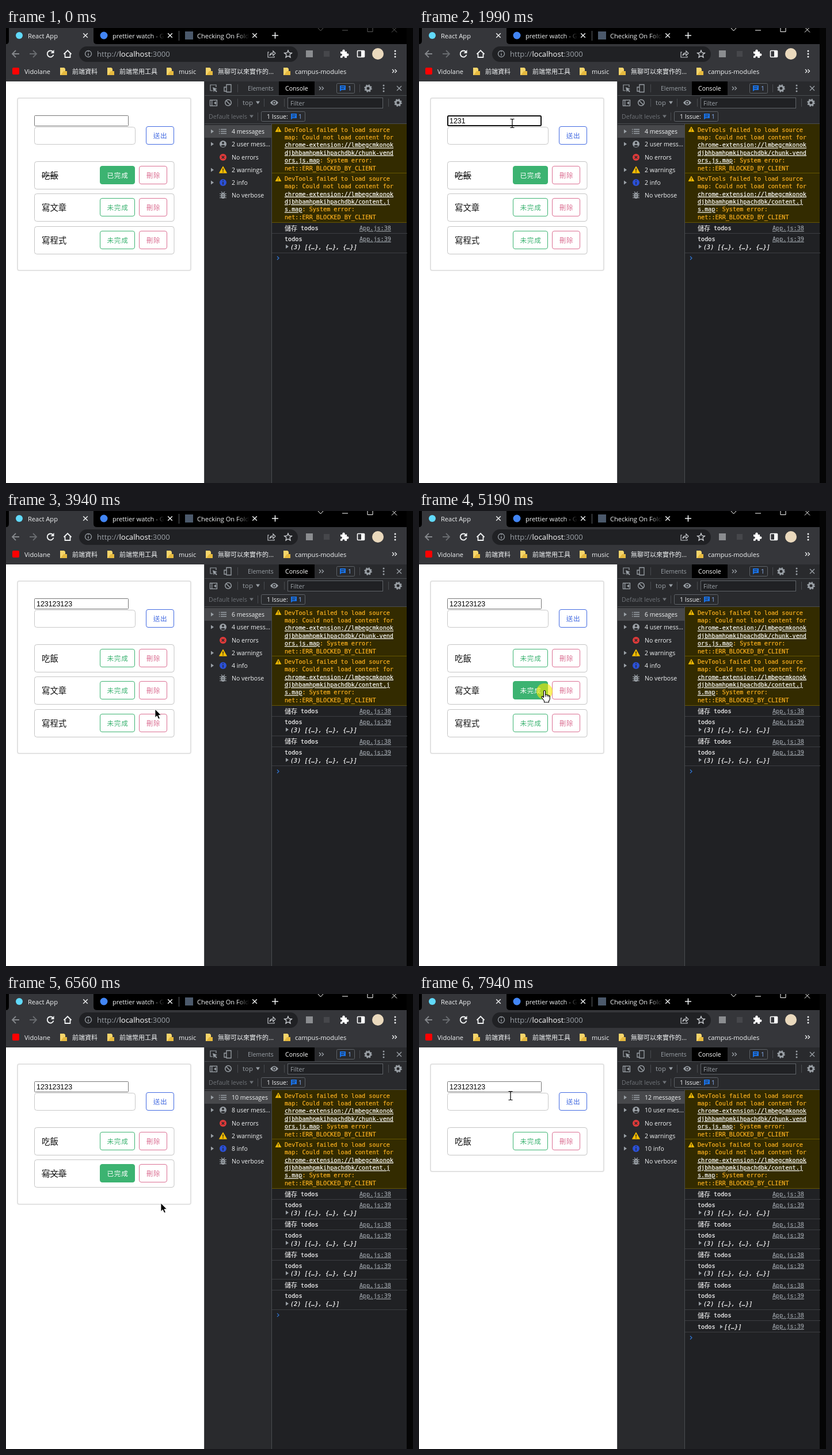
These frames come from a looping animation (707x792 px, 8 s). An HTML page:

```html
<!DOCTYPE html>
<html lang="zh-Hant">
<head>
<meta charset="utf-8">
<title>Todo list</title>
<style>
html, body { margin: 0; width: 100%; height: 100%; overflow: hidden; background: #050505; }
svg { display: block; }
text { font-family: "Open Sans", "Noto Sans CJK TC", "Noto Sans CJK", sans-serif; white-space: pre; }
.cjk { font-family: "Noto Sans CJK TC", "Noto Sans CJK", sans-serif; }
.thin { font-weight: 300; }
.mono { font-family: "DejaVu Sans Mono", "Noto Sans CJK TC", "Noto Sans CJK", monospace; }
.arial { font-family: "Liberation Sans", Arial, sans-serif; }
.link { text-decoration: underline; }
.it { font-style: italic; }
</style>
</head>
<body>
<svg width="707" height="792" viewBox="0 0 707 792">
  <g id="back"></g><g id="live"></g><g id="click"></g><g id="pointer"></g>
</svg>
<script>
const el = id => document.getElementById(id);
const rect = (x, y, w, h, fill, more = '') =>
  `<rect x="${x}" y="${y}" width="${w}" height="${h}" fill="${fill}" ${more}/>`;
const box = (x, y, w, h, stroke, r = 4, fill = 'none', sw = 1) =>
  rect(x + .5, y + .5, w - 1, h - 1, fill, `stroke="${stroke}" stroke-width="${sw}" rx="${r}"`);
const disc = (x, y, r, fill, more = '') => `<circle cx="${x}" cy="${y}" r="${r}" fill="${fill}" ${more}/>`;
const line = (d, stroke, w = 1) => `<path d="${d}" fill="none" stroke="${stroke}" stroke-width="${w}"/>`;
const shape = (d, fill, more = '') => `<path d="${d}" fill="${fill}" ${more}/>`;
// y is the middle of the capitals
const text = (x, y, s, size, fill, cls = '', more = '') =>
  `<text x="${x}" y="${y + size * .37}" font-size="${size}" fill="${fill}" class="${cls}" ${more}>${s}</text>`;
// A hairline stroke gives the console text its weight
const mono = (x, y, s, fill = '#fff', cls = '') =>
  text(x, y, s, 10.15, fill, 'mono ' + cls, `stroke="${fill}" stroke-width=".2"`);
const at = (x, y, s) => `<g transform="translate(${x} ${y})">${s}</g>`;

const PALE = '#f1f3f4', GREY = '#9aa0a6', DIM = '#6e7277', BAR = '#35363a', PANEL = '#292a2d', INK = '#202124', RULE = '#494c50';
const GREEN = '#3cb371', PINK = '#db7093', BLUE = '#4169e1';

const cross = (x, y, r, c, w = 1.4) => line(`M${x - r} ${y - r}l${2 * r} ${2 * r}m0 ${-2 * r}l${-2 * r} ${2 * r}`, c, w);
const dots = (x, y, c) => [-5, 0, 5].map(d => disc(x, y + d, 1.5, c)).join('');
const chevrons = (x, y, c) => line(`M${x - 4} ${y - 3}l3 3l-3 3m4.5 -6l3 3l-3 3`, c, 1.3);
const gear = (x, y) => disc(x, y, 4, 'none', `stroke="${GREY}" stroke-width="3"`) +
  disc(x, y, 5.8, 'none', `stroke="${GREY}" stroke-width="2" stroke-dasharray="2.3 2.255"`);
const down = (x, y, c) => shape(`M${x} ${y - 2.5}h7l-3.5 5z`, c);
const right = (x, y) => shape(`M${x} ${y - 3.5}v7l5 -3.5z`, GREY);
const bubble = (x, y) => shape(`M${x} ${y - 4}h10v8h-7l-3 2.5z`, '#1a73e8') +
  line(`M${x + 2} ${y - 1.5}h6m-6 3h5`, INK);
const warn = (x, y, s) => at(x, y, `<g transform="scale(${s})">` +
  shape('M0 -5.5L6 5H-6z', '#f5bd00', 'stroke="#f5bd00" stroke-linejoin="round"') +
  rect(-.7, -2.5, 1.4, 4, INK) + rect(-.7, 2.6, 1.4, 1.4, INK) + '</g>');
const folder = x => shape(`M${x} 69h7l2 2v11h-9z`, '#f6d56b') + shape(`M${x + 6} 75h6v7h-11z`, '#e5b93f');

function tabStrip() {
  const names = ['React App', 'prettier watch - G', 'Checking On Fold'];
  let s = rect(0, 0, 697, 30, '#000') + shape('M0 28Q5 28 5 22V0H152V22Q152 28 158 28z', BAR);
  s += disc(23, 13, 6, '#61dafb') + disc(170, 13, 6.5, '#4285f4') + rect(311, 6, 14, 14, '#4b596b');
  names.forEach((name, i) => {
    const x = i * 147;
    s += text(38 + x, 13.5, name, 11.1, PALE);
    if (i) s += rect(107 + x, 2, 21, 24, 'url(#fade)') + rect(127 + x, 2, 6, 24, '#000');
    s += cross(138 + x, 13, 3.8, PALE);
  });
  return s + rect(300, 5, 1, 17, '#5f6368') + line('M462 13h11m-5.5 -5.5v11', PALE, 1.6);
}

function toolbar() {
  const arrow = (x, c, f) => line(`M${x - 6 * f} 45h${12 * f}m${-6 * f} -6l${-6 * f} 6l${6 * f} 6`, c, 1.8);
  let s = rect(0, 28, 697, 65, BAR) + rect(127, 32, 380, 27, INK, 'rx="13.5"');
  s += arrow(17, '#85888c', 1) + arrow(47, '#696c70', -1);
  s += line('M81.5 41.5A5.5 5.5 0 1 0 82.5 46.5', PALE, 1.9) + shape('M83.5 38v6h-6z', PALE);
  s += line('M100.5 45.5l6.5 -6.5l6.5 6.5M102.5 44.5v6.5h9v-6.5', PALE, 1.8);
  s += disc(143, 45, 5.5, 'none', `stroke="${GREY}" stroke-width="1.3"`) + line('M143 44v4m0 -6v-1.2', GREY, 1.4);
  s += text(158, 45, `<tspan fill="${GREY}">http://</tspan>localhost<tspan fill="${GREY}">:3000</tspan>`, 13.1, '#fff');
  s += line('M457 42h-2v9h11v-2M458 48q1 -5 6 -5v-3l4 4l-4 4v-3q-4 0 -6 3z', '#c4c7cb', 1.2);
  s += line('M490 39l1.8 4.2l4.6 .4l-3.5 3l1.1 4.5l-4 -2.4l-4 2.4l1.1 -4.5l-3.5 -3l4.6 -.4z', '#d4d7db', 1.3);
  s += rect(521, 39, 12, 12, '#8b8d90') + rect(552, 40, 10, 10, '#46474b');
  s += shape('M581 41h3.5a2.3 2.3 0 1 1 4 0h3.5v3.5a2.3 2.3 0 1 1 0 4v3.5h-3.8a2 2 0 1 0 -3.6 0h-3.6v-3.8a2 2 0 1 0 0 -3.6z', '#fff');
  s += box(610, 39, 13, 12, '#fff', 1, 'none', 1.6) + rect(617, 40, 5, 10, '#fff');
  s += disc(646, 45, 10, '#ead9bd') + dots(676, 45, PALE);
  s += rect(11, 69, 12, 12, '#f00', 'rx="2"') + text(32, 76, 'Vidolane', 11.1, PALE);
  s += [94, 176, 279, 347, 482].map(folder).join('');
  s += text(115, 76, '前端資料', 11, PALE, 'cjk') + text(197, 76, '前端常用工具', 11, PALE, 'cjk');
  s += text(300, 76, 'music', 11, PALE) + text(368, 76, '無聊可以來實作的...', 11, PALE, 'cjk');
  return s + text(502, 76, 'campus-modules', 11.1, PALE) + chevrons(675, 75, PALE);
}

function panelBars() {
  let s = rect(344, 93, 353, 699, PANEL) + rect(462, 167, 235, 625, INK) + rect(461, 167, 1, 625, RULE);
  s += rect(344, 93, 1, 699, RULE) + [117, 166].map(y => rect(345, y, 352, 1, RULE)).join('');
  s += rect(474, 93, 62, 24, '#000') + text(420, 105, 'Elements', 10.4, GREY) + text(485, 105, 'Console', 10.6, '#fff');
  s += line('M365 103v-4h-10v10h4', GREY, 1.2) + shape('M359 103l8 3l-3.3 1.3l3 3l-1.4 1.4l-3 -3l-1.3 3.3z', GREY);
  s += line('M383 110h-4v-7h4M383 98.5h8v13h-8z', GREY, 1.3);
  s += chevrons(548, 105, GREY) + box(574, 96, 32, 18, '#5f6368', 2) + bubble(580, 104) + text(594, 105, '1', 10.5, '#8ab4f8');
  s += gear(629, 105) + dots(656, 105, GREY) + cross(683, 105, 4, GREY);
  s += [402, 614].map(x => rect(x, 98, 1, 14, RULE)).join('');
  s += [402, 448, 483, 664].map(x => rect(x, 123, 1, 14, RULE)).join('');
  s += box(354, 125, 13, 11, GREY, 0, 'none', 1.3) + rect(357, 125, 1.3, 11, GREY) + shape('M365 127.5v6l-4 -3z', GREY);
  s += disc(386, 130, 5.3, 'none', `stroke="${GREY}" stroke-width="1.5"`) + line('M382.5 126.5l7 7', GREY, 1.5);
  s += text(411, 130, 'top', 11.4, GREY) + down(434, 130, GREY);
  s += shape('M459 130q7 -9 14 0q-7 9 -14 0z', GREY) + disc(466, 130, 3, PANEL) + disc(466, 130, 1.6, GREY);
  s += box(489, 121, 166, 19, '#5f6368', 0, INK) + text(494, 131, 'Filter', 10.6, GREY) + gear(681, 130);
  s += text(352, 154, 'Default levels', 10.7, DIM) + down(423, 154, DIM) + rect(437, 147, 1, 14, RULE);
  return s + box(443, 145, 77, 18, '#5f6368', 2) + text(453, 154, '1 Issue:', 10.5, PALE) + bubble(495, 153) +
    text(508, 154, '1', 10.5, '#8ab4f8');
}

function sidebar() {
  let s = rect(345, 169, 116, 22, '#47484b') + [180, 202, 247, 269].map(y => right(356, y)).join('');
  s += line('M373 176.5h10m-10 3.5h10m-10 3.5h10M370 176.5h1.5m-1.5 3.5h1.5m-1.5 3.5h1.5', GREY, 1.3);
  s += disc(377, 202, 6, GREY) + disc(377, 200, 2, PANEL) + shape('M373 205.5q4 -4 8 0q-4 3 -8 0z', PANEL);
  s += disc(377, 225, 6, '#e03a3a') + cross(377, 225, 2.3, PANEL, 1.5) + warn(377, 247, 1.05);
  s += disc(377, 269, 6, '#2b50d6') + line('M377 268v4.5m0 -6v-1.7', PANEL, 1.6);
  s += rect(373.5, 287, 7, 10, GREY, 'rx="3.5"') + line('M371 288.5h12m-12 3.5h12m-12 3.5h12M374 285l2 2m4 -2l-2 2', GREY, 1.2);
  s += line('M375.5 290.5h3m-3 3h3', PANEL) + text(392, 225, 'No errors', 10.5, PALE);
  return s + text(392, 247, '2 warnings', 10.5, PALE) + text(392, 291.5, 'No verbose', 10.5, PALE);
}

function warnings() {
  const gold = '#ffb31f';
  const files = [['djbhbamhpmkihpachdbk/chunk-vend', 'ors.js.map'], ['djbhbamhpmkihpachdbk/content.j', 's.map']];
  return files.map(([head, tail], i) => {
    const top = 167 + i * 86;
    const row = (n, s, fill = gold, cls) => mono(484, 177 + i * 85.3 + n * 13.35, s, fill, cls);
    return rect(462, top, 235, 85, '#332b00') + rect(462, top + 85, 235, 1, '#665500') + warn(473, top + 9.5, .8) +
      row(0, 'DevTools failed to load source') + row(1, 'map: Could not load content for') +
      row(2, 'chrome-extension://lmbegcmkonok', '#fff', 'link') + row(3, head, '#fff', 'link') +
      row(4, `<tspan class="link" fill="#fff" stroke="#fff">${tail}</tspan>: System error:`) +
      row(5, 'net::ERR_BLOCKED_BY_CLIENT');
  }).join('');
}

el('back').innerHTML =
  '<defs><linearGradient id="fade"><stop stop-color="#000" stop-opacity="0"/><stop offset="1"/></linearGradient></defs>' +
  tabStrip() + toolbar() + rect(0, 93, 344, 699, '#fff') + panelBars() + sidebar() + warnings() +
  rect(696, 0, 11, 792, '#050505');

const LOOP = 8000, SHOWN = 70, ACTIVE = 870, FOCUS = 1000, BLUR = 2880;
const KEYS = [1550, 1620, 1690, 1990, 2040, 2090, 2250, 2285, 2320];
const SAVES = [3180, 5340, 6400, 7430];
const CLICKS = [[870, 1000], [2880, 3180], [5130, 5340], [6160, 6400], [7250, 7430]];
// time, x, y
const PATH = [[70, 694, 330], [400, 430, 250], [840, 163, 172], [870, 162, 166], [2570, 162, 166],
  [2720, 194, 251], [3460, 194, 251], [3580, 258, 362], [3790, 258, 362], [3940, 259, 345], [4060, 262, 350],
  [4260, 262, 350], [4600, 255, 361], [5040, 212, 338], [5070, 212, 338], [5120, 218, 313], [5530, 218, 313],
  [5810, 269, 364], [6950, 269, 364], [7130, 262, 314], [7500, 262, 314], [7730, 164, 230],
  [7760, 164, 230], [7940, 159, 177]];

const passed = (list, t) => list.filter(k => t >= k).length;

function place(t) {
  const i = PATH.findIndex(p => p[0] > t);
  if (i < 0) return PATH[PATH.length - 1].slice(1);
  if (!i) return PATH[0].slice(1);
  const [t0, x0, y0] = PATH[i - 1], [t1, x1, y1] = PATH[i], u = (t - t0) / (t1 - t0);
  return [x0 + (x1 - x0) * u, y0 + (y1 - y0) * u];
}

const TODOS = ['吃飯', '寫文章', '寫程式'];
const BTN_H = 32, SEND = [243, 171, 49, BTN_H];
const rowY = i => 232 + Math.floor(i * 56.5);
const doneBox = i => [163, rowY(i) + 8, 61, BTN_H];
const delBox = i => [231, rowY(i) + 8, 49, BTN_H];

// Which control lies under the pointer
function hit(x, y, rows) {
  const inside = ([bx, by, w, h]) => x >= bx && x < bx + w && y >= by && y < by + h;
  if (inside([49, 152, 164, 19]) || inside([49, 173, 176, 30])) return 'field';
  if (inside(SEND)) return 'send';
  for (let i = 0; i < rows; i++) {
    if (inside(doneBox(i))) return 'done' + i;
    if (inside(delBox(i))) return 'del' + i;
  }
  return '';
}

function button([x, y, w, h], label, color, full) {
  return box(x, y, w, h, color, 3.5, full ? color : '#fff') +
    text(x + w / 2 + .5, y + 17, label, 11.6, full ? '#fff' : color, 'cjk thin', 'text-anchor="middle" letter-spacing=".7"');
}

function page({ saves, rows, typed, focus, over }) {
  let s = rect(20, 122, 301, rowY(rows) - 101, '#fff', 'rx="3" stroke="#e2e2e2" stroke-width="2"');
  s += focus ? rect(50, 153, 162, 17, '#fff', 'rx="1.5" stroke="#101010" stroke-width="2"') : box(49, 152, 164, 19, '#767676', 1, '#fff');
  s += text(53, 161.5, '123123123'.slice(0, typed), 12.4, '#000', 'arial');
  s += box(49, 172, 176, 31, '#c8c8c8') + button(SEND, '送出', BLUE, over === 'send');
  TODOS.slice(0, rows).forEach((name, i) => {
    const y = rowY(i), done = i === 0 ? saves < 1 : i === 1 && saves > 1;
    s += box(49, y, 243.5, 49, '#c4c4c4') + text(62, y + 25, name, 14.4, '#111', 'cjk thin');
    if (done) s += rect(62, y + 25, name.length * 14.4, 1, '#111');
    s += button(doneBox(i), done ? '已完成' : '未完成', GREEN, done || over === 'done' + i);
    s += button(delBox(i), '刪除', PINK, over === 'del' + i);
  });
  return s;
}

function log(saves) {
  const n = saves * 2 + 2, rule = y => rect(462, Math.round(y), 235, 1, '#3c3e42');
  let s = text(392, 180, n + 2 + ' messages', 10.5, PALE);
  s += text(392, 202, n + (n > 9 ? ' user mes...' : ' user mess...'), 10.5, PALE) + text(392, 269, n + ' info', 10.5, PALE);
  let end;
  for (let i = 0; i <= saves; i++) {
    const y = 348.5 + i * 52.8, items = Math.min(3, 5 - i);
    const list = '[' + Array(items).fill('{…}').join(', ') + ']';
    s += text(484, y, '儲存', 11, '#fff', 'cjk') + mono(512, y, 'todos') + mono(614, y, 'App.js:38', GREY, 'link') + rule(y + 8.5);
    s += mono(614, y + 18.7, 'App.js:39', GREY, 'link');
    if (items > 1) {
      s += mono(484, y + 18.7, 'todos') + right(486, y + 32) + mono(494, y + 32.5, `(${items}) ${list}`, '#fff', 'it');
      end = y + 42;
    } else {
      s += mono(484, y + 19.7, 'todos') + right(523, y + 19.5) + mono(530, y + 19.7, list, '#fff', 'it');
      end = y + 28.5;
    }
    s += rule(end);
  }
  return s + line(`M471 ${end + 7}l3 3l-3 3`, '#2f74d0', 1.3);
}

function controls(active) {
  const c = active ? '#fff' : '#5c5c5c';
  return line('M542 0l4.5 5l4.5 -5M584 4h10M628 -3v9.5h9v-9.5M670 -1.5l9 9m0 -9l-9 9', c);
}

const ARROW = shape('M0 0V14.5L3.3 11.5L5.8 17L8.3 15.9L5.9 10.5H10.3z', '#000', 'stroke="#fff" stroke-width=".8"');
const BEAM = line('M-3.5 -7.5h2.5l1 1l1 -1h2.5M0 -6.5v13M-3.5 7.5h2.5l1 -1l1 1h2.5', '#000', 1.2);
const HAND = shape('M-1.5 1Q-1.5 -.5 0 -.5T1.5 1V7Q3.5 5.8 4.5 7.5Q6.5 6.7 7.2 8.5Q9.3 8 9.3 10.5V14Q9.3 16 7.5 17.5V20H-.5V17.5L-5 11.5Q-5.5 9.5 -3.5 9.5L-1.5 11.5z',
  '#fff', 'stroke="#000" stroke-width="1.1" stroke-linejoin="round"') + line('M1.5 7v3.5M4.5 8v2.5M7.2 9v2', '#000', .9);

let last = '';
function draw(t) {
  const saves = passed(SAVES, t), rows = 3 - Math.max(0, saves - 2);
  const [x, y] = place(t), over = t < SHOWN ? '' : hit(x, y, rows);
  const state = { saves, rows, typed: passed(KEYS, t), focus: t >= FOCUS && t < BLUR, active: t >= ACTIVE, over };
  const key = JSON.stringify(state);
  if (key !== last) {
    el('live').innerHTML = controls(state.active) + page(state) + log(saves);
    last = key;
  }
  const pressed = CLICKS.some(([a, b]) => t >= a && t < b);
  el('click').innerHTML = pressed ? disc(x, y + 1, 14, '#f5ea00', 'opacity=".6"') : '';
  const icon = !over ? ARROW : over === 'field' ? BEAM : HAND;
  el('pointer').innerHTML = t < SHOWN ? '' : at(x, y, icon);
}

const start = performance.now();
function tick() {
  draw((performance.now() - start) % LOOP);
  requestAnimationFrame(tick);
}
tick();
</script>
</body>
</html>
```
